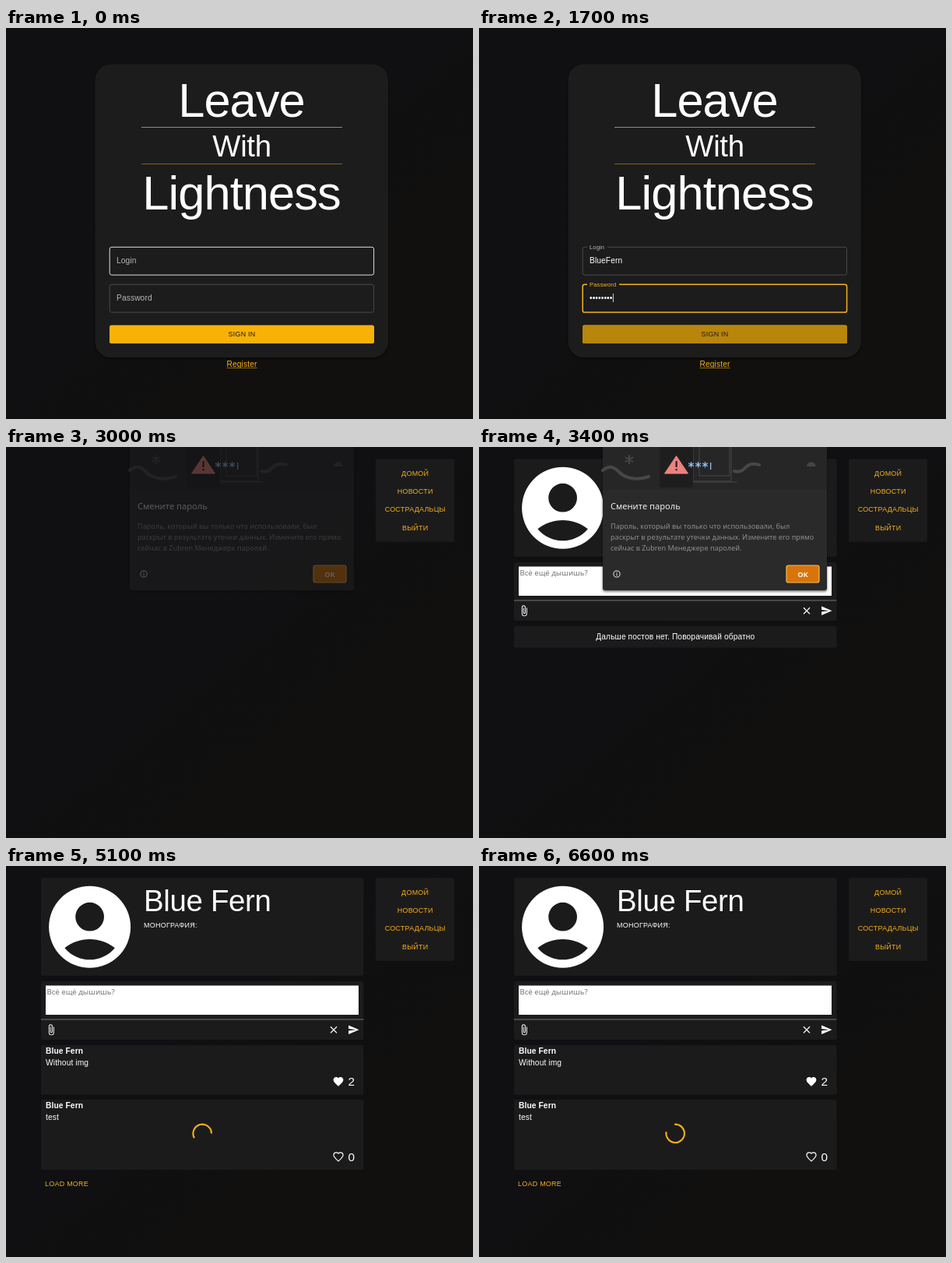
Recreate the animation shown at these times as an HTML page. Size 600 px wide and 502 px high, loop 6.7 s.

```html
<!DOCTYPE html>
<html lang="en">
<head>
<meta charset="utf-8">
<title>Sign in and profile</title>
<style>
  html, body { margin: 0; width: 100%; height: 100%; overflow: hidden; background: #100f11; }
  svg { display: block; width: 600px; height: 502px; }
  text { font-family: "Liberation Sans", Arial, sans-serif; font-size: 10.24px; fill: #fff; white-space: pre; }
  .h1 { font-size: 61.44px; letter-spacing: -.01562em; text-anchor: middle; }
  .h2 { font-size: 38.4px; letter-spacing: -.00833em; }
  .mid { text-anchor: middle; }
  .body { letter-spacing: .00938em; }
  .bold { font-weight: 700; }
  .btn { font-size: 8.96px; letter-spacing: .02857em; }
  .gold { fill: #f5b01c; }
  .count { font-size: 15.36px; }
  .ui { font-family: "Noto Sans", "Open Sans", sans-serif; }
</style>
</head>
<body>
<svg viewBox="0 0 600 502">
  <defs>
    <linearGradient id="page" x2="1" y2="1">
      <stop offset=".4" stop-color="#100f12"/><stop offset=".75" stop-color="#11100e"/>
    </linearGradient>
    <linearGradient id="card" x2="0" y2="1">
      <stop offset=".4" stop-color="#1d1c1e"/><stop offset=".8" stop-color="#1d1c1a"/>
    </linearGradient>
    <filter id="shadow" x="-10%" y="-10%" width="120%" height="120%">
      <feDropShadow dx="0" dy="1.5" stdDeviation="1.8" flood-opacity=".6"/>
    </filter>
  </defs>
  <rect width="600" height="502" fill="url(#page)"/>
  <g id="stage"></g>
</svg>
<script>
const LOOP = 6700, STEP = 100, SPIN = 1210;
const GOLD = '#f5b11f', PANEL = '#1c1b1c';
const stage = document.getElementById('stage');

const clamp = x => Math.min(1, Math.max(0, x));
const ramp = (t, from, length) => clamp((t - from) / length);
const ease = x => x * x * (3 - 2 * x);
const mix = (a, b, k) => a + (b - a) * k;

const rect = (x, y, w, h, fill, rx = 0, more = '') =>
  `<rect x="${x}" y="${y}" width="${w}" height="${h}" rx="${rx}" fill="${fill}" ${more}/>`;
const text = (x, y, s, cls = '', more = '') => `<text x="${x}" y="${y}" class="${cls}" ${more}>${s}</text>`;
const line = (x1, x2, y, color) => rect(x1, y, x2 - x1, 1, color);
const fade = (k, s) => k > 0 ? `<g opacity="${k}">${s}</g>` : '';
const icon = (cx, cy, d, scale = .64, more = 'fill="#fff"') =>
  `<path transform="translate(${cx} ${cy}) scale(${scale}) translate(-12 -12)" d="${d}" ${more}/>`;

const HEART = 'M12 21.35l-1.45-1.32C5.4 15.36 2 12.28 2 8.5 2 5.42 4.42 3 7.5 3c1.74 0 3.41.81 4.5 2.09C13.09 3.81 14.76 3 16.5 3 19.58 3 22 5.42 22 8.5c0 3.78-3.4 6.86-8.55 11.54z';
const PERSON = 'M12 2a10 10 0 1 0 0 20a10 10 0 1 0 0-20zm0 4a3.5 3.5 0 1 1 0 7a3.5 3.5 0 1 1 0-7zm0 14c-2.03 0-4.43-.82-6.14-2.88C7.55 15.8 9.68 15 12 15s4.45.8 6.14 2.12C16.43 19.18 14.03 20 12 20z';
const CLIP = 'M16.5 6v11.5a4 4 0 0 1-8 0V5a2.5 2.5 0 0 1 5 0v10.5a1 1 0 0 1-2 0V6H10v9.5a2.5 2.5 0 0 0 5 0V5a4 4 0 0 0-8 0v12.5a5.5 5.5 0 0 0 11 0V6z';
const CROSS = 'M19 6.41 17.59 5 12 10.59 6.41 5 5 6.41 10.59 12 5 17.59 6.41 19 12 13.41 17.59 19 19 17.59 13.41 12z';
const SEND = 'M2.01 21 23 12 2.01 3 2 10l15 2-15 2z';

// Indeterminate ring: the head runs out first, then the tail catches up.
function spinner(cx, cy, age) {
  const p = ((age / SPIN) % 1 + 1) % 1;
  const grow = ease(clamp(p * 2)), chase = ease(clamp(p * 2 - 1));
  const tail = 15 * grow + 110 * chase;
  const length = Math.min(1 + 99 * grow, 126.9 - tail);
  return `<circle r="20.2" fill="none" stroke="${GOLD}" stroke-width="3.6"
    stroke-dasharray="${length} 200" stroke-dashoffset="${-tail}"
    transform="translate(${cx} ${cy}) scale(.582) rotate(${360 * p})"/>`;
}

function field(y, label, notch, value, raised, focused, hovered, caret) {
  const color = focused ? GOLD : hovered ? '#f4f4f4' : '#504f50';
  const size = mix(10.24, 7.68, raised);
  return rect(133.2, y + .3, 339.4, 35.8, 'none', 2.6, `stroke="${color}" stroke-width="${focused ? 1.5 : .9}"`)
    + (raised ? rect(139, y - 1, notch * raised, 3, '#1d1c1c') : '')
    + text(142, y + mix(21, 2.7, raised), label, 'body',
      `style="font-size:${size}px;fill:${focused ? GOLD : '#b8b7b8'}"`)
    + text(142, y + 21, value, 'body')
    + (focused && caret ? rect(caret, y + 12, .8, 11, '#fff') : '');
}

function suggestions() {
  const names = ['BlueFern', 'RedOakBranch', 'RedOakBark'];
  return rect(197, 329, 91, 67, '#201e1c', 1, 'filter="url(#shadow)"')
    + rect(197, 329, 91, 20, '#262424', 1)
    + names.map((s, i) => text(204, 340.5 + 23 * i, s, 'ui', 'style="font-size:9.7px;fill:#dcdcdc"')).join('');
}

function loginPage(t) {
  const loading = t >= 2100, drop = loading ? 8 : 0, shift = drop / 2;
  const named = t >= 700, dots = Math.max(0, Math.min(8, Math.floor((t - 1100) / 60)));
  const onPassword = t >= 1100;
  return rect(114.5, 46.5, 376.5, 376.5, 'url(#card)', 20.5, 'filter="url(#shadow)"')
    + `<g transform="translate(0 ${shift})">`
    + text(302.5, 113.5, 'Leave', 'h1') + line(174, 432, 127, '#8b8a8b')
    + text(303, 164.5, 'With', 'h2 mid') + line(174, 432, 174, loading ? '#a07a10' : '#80630c')
    + text(302.5, 233, 'Lightness', 'h1') + '</g>'
    + field(281 + drop, 'Login', 26, named ? 'BlueFern' : '', ramp(t, 200, 200),
      t >= 300 && !onPassword, t < 300, named ? 183.5 : 142)
    + field(329 + drop, 'Password', 41, '•'.repeat(dots), ramp(t, 1000, 200),
      onPassword && !loading, t >= 600 && t < 1100, 142.5 + 3.68 * dots)
    + (loading ? spinner(303, 392.3, t - 2055)
      : rect(133, 381.5, 340, 23.5, '#f8b207', 2.6)
        + fade(ramp(t, 1500, 200), rect(133, 381.5, 340, 23.5, '#b9860c', 2.6))
        + text(303, 396.2, 'SIGN IN', 'btn mid', 'style="fill:#231c0c"'))
    + text(303, 434.5, 'Register', 'body mid gold') + line(283.5, 322.5, 436, '#8a6a1c')
    + (t >= 500 && t < 1000 ? suggestions() : '');
}

function popup() {
  const grey = 'fill="none" stroke="#484748" stroke-linecap="round"';
  const copy = ['Пароль, который вы только что использовали, был',
    'раскрыт в результате утечки данных. Измените его прямо',
    'сейчас в Zubren Менеджере паролей.'];
  return rect(159, -4, 288, 188, '#2a292a', 3, 'filter="url(#shadow)"')
    + rect(159, 0, 288, 55, '#272627')
    + `<path d="M159 30c10-8 16-3 22 3s20 11 37 5M328 31c16 4 12-14 32-8" ${grey} stroke-width="4"/>`
    + `<path d="M193 11v10M188.5 13.5l9 5M197.500 13.500l-9 5" ${grey} stroke-width="2"/>`
    + `<path d="M275 0v44h49V0M283 0v37h39V0M262 45h69" ${grey}/>`
    + rect(232, 0, 43, 52, '#1f1e1f', 2)
    + '<path d="M421 25a5.800 5.800 0 0 1 11.600 0z" fill="#464546"/>'
    + '<path d="M253.500 11.500 268.500 34h-30z" fill="#ed827e" stroke="#ed827e" stroke-linejoin="round"/>'
    + rect(252.500, 18, 2.200, 8, '#2a2021') + rect(252.500, 28, 2.200, 2.200, '#2a2021')
    + text(268, 31, '***', '', `style="font:700 15px 'DejaVu Sans Mono',monospace;fill:#8fc0f5"`)
    + rect(297, 20, 1.300, 9, '#8fc0f5')
    + text(169, 80, 'Смените пароль', 'ui', 'style="font-size:11.1px;fill:#eee"')
    + copy.map((s, i) => text(169, 104.5 + 14 * i, s, 'ui', 'style="font-size:9.1px;fill:#8f8e8f"')).join('')
    + '<circle cx="177" cy="163" r="4.100" fill="none" stroke="#e8e8e8"/>'
    + rect(176.500, 162.300, 1, 3, '#e8e8e8') + rect(176.500, 160.500, 1, 1, '#e8e8e8')
    + rect(395, 152, 42, 22, '#d8740b', 2.5, 'stroke="#f3bd55" stroke-width="1.2"')
    + text(416, 166.5, 'OK', 'ui bold mid', 'style="font-size:9.3px;fill:#fff3df"');
}

function post(y, h, message, likes) {
  const hy = y + h - 16.7;
  return rect(45, y, 414.5, h, PANEL, 2.6)
    + text(51, y + 11, 'Blue Fern', 'body bold') + text(51, y + 26.3, message, 'body')
    + (likes ? icon(427, hy, HEART)
      : icon(427, hy, HEART, .6, 'fill="none" stroke="#fff" stroke-width="2"'))
    + text(439.5, hy + 5.3, likes, 'count');
}

function profile(t) {
  const loaded = t >= 4200;
  return rect(45, 15.3, 414.5, 125.5, PANEL, 2.6)
    + icon(107.6, 78.3, PERSON, 5.25, 'fill="#fff" fill-rule="evenodd"')
    + text(177, 58, 'Blue Fern', 'h2') + text(177, 79, 'МОНОГРАФИЯ:', 'btn')
    + rect(45, 148, 414.5, 75, PANEL, 2.6) + rect(51, 153.5, 402, 37.5, '#fff')
    + text(52.5, 164.7, 'Всё ещё дышишь?', 'ui', 'style="font-size:9.6px;fill:#757575"')
    + line(45, 459.5, 196.5, '#757476')
    + icon(58, 210.3, CLIP) + icon(421, 210.3, CROSS) + icon(446.5, 210.3, SEND)
    + (loaded ? post(230, 63.5, 'Without img', 2) + post(300, 90, 'test', 0) + spinner(252.2, 343.4, t - 4700)
      : rect(45, 230, 414.5, 27.5, PANEL, 2.6)
        + text(252.3, 247, 'Дальше постов нет. Поворачивай обратно', 'body mid'))
    + (t >= 4500 ? text(50, 411, 'LOAD MORE', 'btn gold') : '');
}

function homePage(t) {
  const menu = ['ДОМОЙ', 'НОВОСТИ', 'СОСТРАДАЛЬЦЫ', 'ВЫЙТИ'];
  return rect(475, 15.3, 101, 106.5, PANEL, 2.6)
    + menu.map((s, i) => text(525.7, 36.8 + 23.3 * i, s, 'btn mid gold')).join('')
    + (t >= 3400 ? profile(t) : '')
    + fade(Math.min(ramp(t, 2900, 300), 1 - ramp(t, 3700, 200)), popup());
}

let shown = -1;
function tick(now) {
  const t = Math.floor(now % LOOP / STEP) * STEP;
  if (t !== shown) {
    shown = t;
    stage.innerHTML = t < 2800 ? loginPage(t) : homePage(t);
  }
  requestAnimationFrame(tick);
}
tick(performance.now());
</script>
</body>
</html>
```
